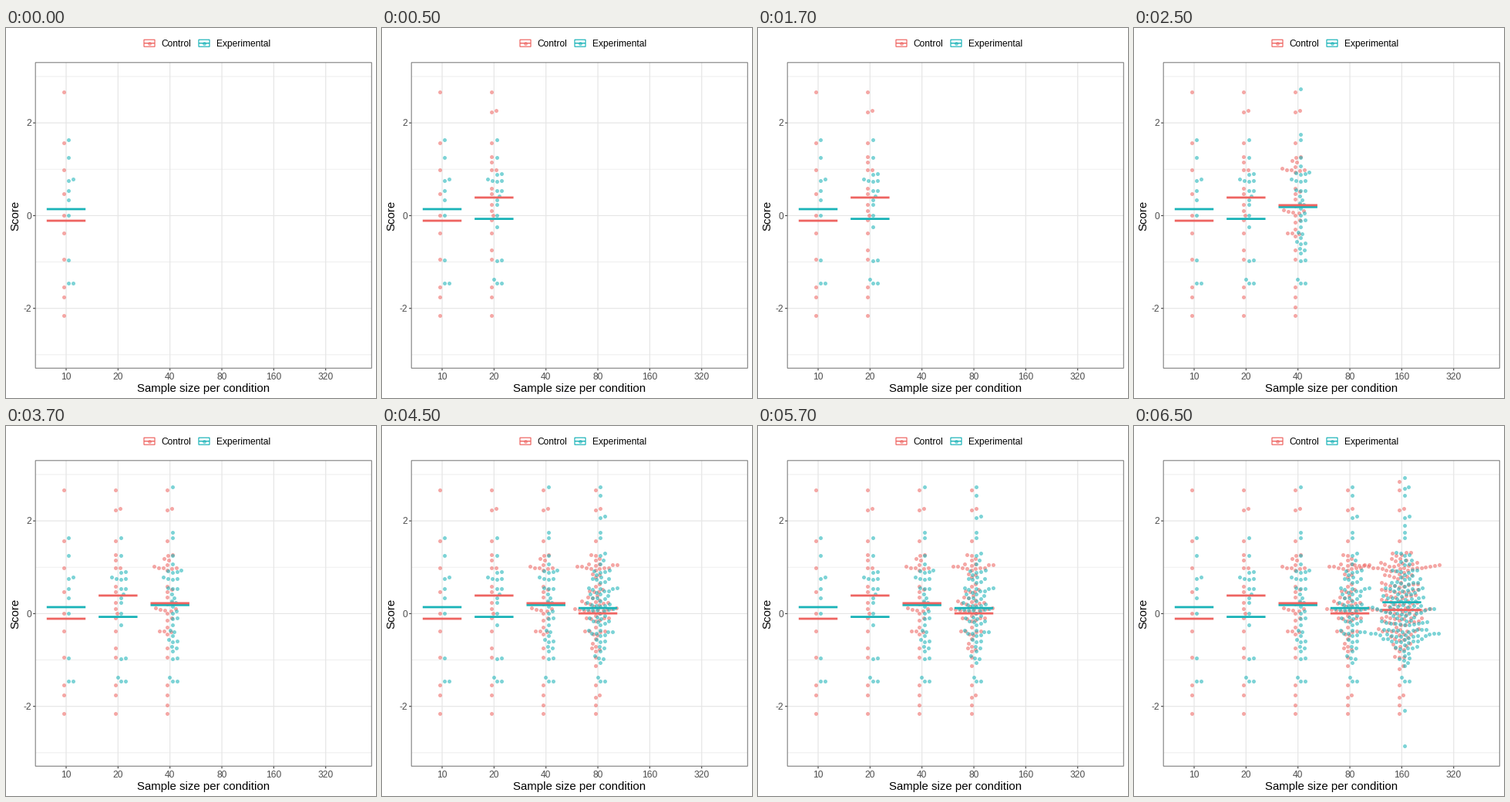
Write a matplotlib script that moves like this. It is 480 px wide and 480 px high and loops after 8 s.

```python
import numpy as np
import matplotlib.pyplot as plt
from matplotlib.animation import FuncAnimation
from matplotlib.patches import Rectangle

plt.rcParams["path.snap"] = False

RED, TEAL = "#ee6461", "#1ab3b8"
SIZES = [10 * 2 ** k for k in range(6)]
LEFT, RIGHT, TOP, BOTTOM = 38.2, 474.3, 44.8, 441.3
ZERO, UNIT = 243.4, 60.15      # pixel row of score 0, pixels per score unit
SPACING = 6.0                  # smallest distance between dots of one swarm
DODGE = 3.4


def row(score):
    return ZERO - UNIT * score


def column(index):
    return 78 + 67.35 * index


def grow_sample(start, outliers, clump, seed):
    """Double the sample up to 160: the next outliers, then random scores."""
    rng = np.random.default_rng(seed)
    scores = list(start)
    for extra in outliers:
        count = len(scores) - len(extra)
        broad = rng.triangular(-1.3, 0.1, 1.45, count)
        dense = rng.normal(clump, 0.1, count)
        scores += [*extra, *np.where(rng.random(count) < 0.15, dense, broad)]
    return np.array(scores)


def swarm(scores):
    """Place dots in ascending order, each as near the centre as it fits."""
    ys = np.sort(scores) * UNIT / SPACING
    xs = np.zeros_like(ys)
    for i in range(1, len(ys)):
        near = np.abs(ys[:i] - ys[i]) < 1
        if not near.any():
            continue
        placed, dy = xs[:i][near], ys[i] - ys[:i][near]
        reach = np.sqrt(1 - dy ** 2)
        options = np.concatenate([[0], placed + reach, placed - reach])
        gaps = (options[:, None] - placed) ** 2 + dy ** 2
        options = options[(gaps >= 0.999).all(axis=1)]
        xs[i] = options[np.argmin(np.abs(options))]
    return xs * SPACING, ZERO - ys * SPACING


def px(size):
    return size * 0.72


fig = plt.figure(figsize=(4.8, 4.8), dpi=100, facecolor="white")
ax = fig.add_axes([0, 0, 1, 1])
ax.set(xlim=(0, 480), ylim=(480, 0))
ax.axis("off")


def line(x0, y0, x1, y1, color, width, z=1):
    return ax.plot([x0, x1], [y0, y1], color=color, lw=px(width),
                   solid_capstyle="butt", zorder=z)[0]


def label(x, y, text, size, color="black", ha="center", rotation=0):
    ax.text(x, y, text, fontsize=px(size), color=color, ha=ha, va="baseline",
            family="Liberation Sans", rotation=rotation, rotation_mode="anchor")


def dots(x, y, color):
    return ax.scatter(x, y, s=px(5) ** 2, color=color, alpha=0.57,
                      linewidths=0, zorder=3)


def legend_key(x, color, text):
    ax.add_patch(Rectangle((x, 15.2), 14, 9, fill=False, ec=color, lw=px(1.2)))
    line(x, 19.7, x + 14, 19.7, color, 1.4)
    dots([x + 7], [19.7], color)
    label(x + 22.5, 24, text, 12, ha="left")


# Panel, grid and axes
for score in range(-3, 4):
    y = row(score)
    if score % 2:
        line(LEFT, y, RIGHT, y, "#ebebeb", 0.8)
        continue
    line(LEFT, y, RIGHT, y, "#e6e6e6", 1.2)
    line(LEFT - 3, y, LEFT, y, "#333333", 1.1)
    label(33, y + 4.2, str(score), 12, "#4d4d4d", "right")
for k, size in enumerate(SIZES):
    x = column(k)
    line(x, TOP, x, BOTTOM, "#e6e6e6", 1.2)
    line(x, BOTTOM, x, BOTTOM + 3, "#333333", 1.1)
    label(x, 456.2, str(size), 12, "#4d4d4d")
ax.add_patch(Rectangle((LEFT, TOP), RIGHT - LEFT, BOTTOM - TOP, fill=False,
                       ec="#7f7f7f", lw=px(1.1), zorder=5))
label(256, 471.8, "Sample size per condition", 15)
label(16, 243.5, "Score", 15, rotation=90)
legend_key(179, RED, "Control")
legend_key(250, TEAL, "Experimental")

control = grow_sample(
    [2.66, 1.57, 0.98, 0.48, 0, -0.38, -0.94, -1.54, -1.76, -2.15],
    [[2.24, 2.26], [-1.97], [-1.8], [2.85]], clump=1.05, seed=4)
experimental = grow_sample(
    [1.63, 1.25, 0.78, 0.755, 0.54, 0.345, 0, -0.965, -1.457, -1.457],
    [[-1.38], [2.735, 1.76], [2.55, 2.1, 2.07], [2.94, 2.7, 1.9, -2.08, -2.85]],
    clump=-0.45, seed=9)
groups = [
    (control, [-0.11, 0.39, 0.225, 0.005, 0.08], RED, -DODGE, 4.1),
    (experimental, [0.14, -0.07, 0.185, 0.12, 0.245], TEAL, DODGE, 4),
]

# One group of artists per sample size
stages = []
for k, size in enumerate(SIZES[:5]):
    x, artists = column(k), []
    for scores, means, color, shift, z in groups:
        dx, y = swarm(scores[:size])
        mean = row(means[k])
        artists += [dots(x + shift + dx, y, color),
                    line(x - 25.2, mean, x + 25.2, mean, color, 2.8, z)]
    stages.append(artists)


def update(frame):
    shown = 1 + (frame + 3) // 4
    for k, artists in enumerate(stages):
        for artist in artists:
            artist.set_visible(k < shown)
    return []


anim = FuncAnimation(fig, update, frames=16, interval=500, repeat=True,
                     repeat_delay=0, init_func=lambda: update(0))
plt.show()
```
